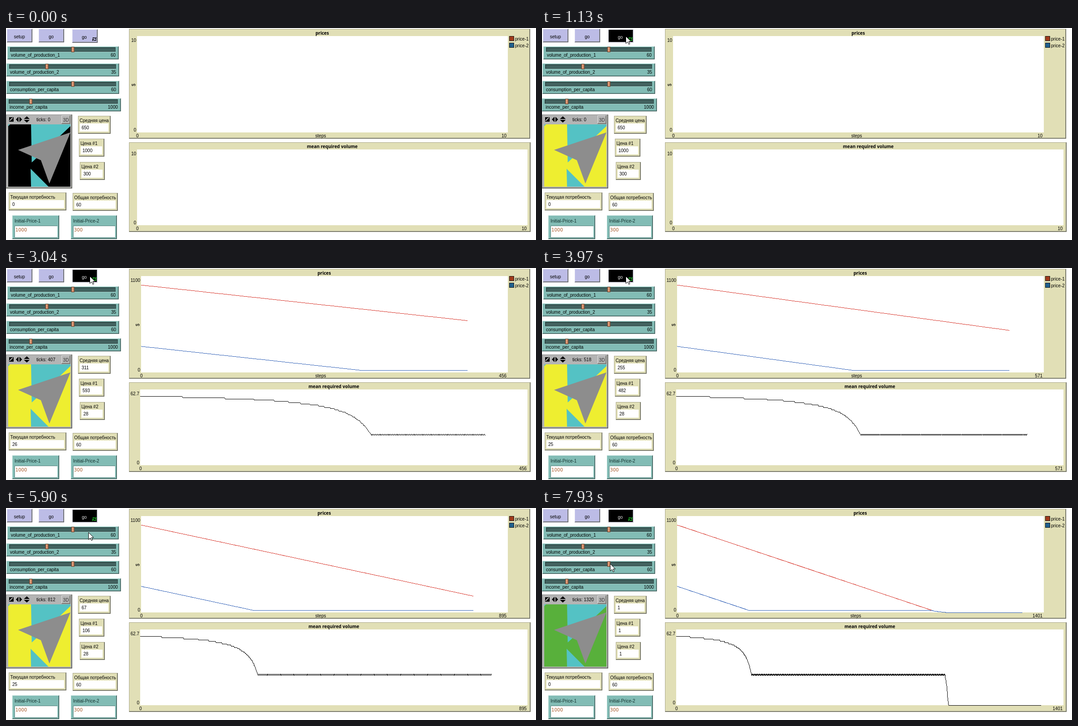
An HTML page with a canvas for the animation above (8 s loop, 1185 by 473 pixels).

```html
<!DOCTYPE html>
<html lang="ru">
<head>
<meta charset="utf-8">
<title>Market model</title>
<style>
html, body { margin: 0; width: 100%; height: 100%; overflow: hidden; background: #fff; }
canvas { display: block; }
</style>
</head>
<body>
<canvas id="stage" width="1185" height="473"></canvas>
<script>
const ctx = document.getElementById('stage').getContext('2d');
const LOOP = 8000, PRESS = 900, LIT = 1130, SATED = 6370;
const SANS = '10px "Liberation Sans", Arial, sans-serif';
const BOLD = 'bold 10px "Noto Sans", sans-serif';
const WIDE = '10.2px "DejaVu Sans", sans-serif';
const CREAM = '#e1dfb6', TEAL = '#82bcb5', LILAC = '#bcbce6';

// The interface redraws only now and then; monitors get one extra refresh
const PLOT_AT = [1390, 1670, 2300, 3040, 3330, 3970, 4500, 4890, 5250, 6230, 6740, 7100, 7400, 7700];
const MONITOR_AT = [...PLOT_AT, 5900];

// Model clock: time, ticks
const CLOCK = [[1390, 103], [3330, 461], [3970, 518], [5250, 812], [5900, 894], [6230, 950], [7100, 1083], [7700, 1320]];

// Pointer: time, x, y
const PATH = [
  [120, 1040, 456], [550, 298, 53], [860, 187, 18], [4500, 187, 18], [4920, 184, 54],
  [7060, 184, 54], [7100, 182, 61], [7500, 167, 114], [7700, 152, 124]
];

// Linear interpolation between keys, rounded
function along(keys, ms) {
  const i = keys.findIndex(k => k[0] > ms);
  if (i < 0) return keys[keys.length - 1].slice(1);
  if (i === 0) return null;
  const a = keys[i - 1], b = keys[i];
  const k = (ms - a[0]) / (b[0] - a[0]);
  return a.slice(1).map((v, j) => Math.round(v + (b[j + 1] - v) * k));
}

function ticksAt(times, ms) {
  const last = Math.max(0, ...times.filter(t => t <= ms));
  return last ? along(CLOCK, last)[0] : 0;
}

// Model
const price1 = t => t < 983 ? 1000 - t : Math.max(1, 17 - (t - 983) / 3);
const price2 = t => Math.min(price1(t), Math.max(300 - t, 28));
function need(t) {
  if (t > 272 && t < 972) return 25 + t % 2;
  return Math.max(0, 60 - Math.floor(1000 / price2(t)));
}

// The axis grows by a quarter whenever the data outruns it
function axisFor(ticks) {
  if (!ticks) return 10;
  let max = 116;
  while (max < ticks) max = Math.round((max + 1) * 1.25);
  return max;
}

// Drawing helpers
function rect(x, y, w, h, color) {
  ctx.fillStyle = color;
  ctx.fillRect(x, y, w, h);
}

function text(s, x, y, align = 'left', font = SANS, color = '#000') {
  ctx.font = font;
  ctx.textAlign = align;
  ctx.fillStyle = color;
  ctx.fillText(s, x, y + 4);
}

function poly(color, ...pts) {
  ctx.fillStyle = color;
  ctx.beginPath();
  for (let i = 0; i < pts.length; i += 2) ctx.lineTo(pts[i], pts[i + 1]);
  ctx.closePath();
  ctx.fill();
}

function panel(x0, y0, x1, y1, fill, light, dark, inner = '#85887c') {
  const w = x1 - x0, h = y1 - y0;
  rect(x0, y0, w, h, dark);
  rect(x0, y0, w - 1, h - 1, light);
  rect(x0 + 1, y0 + 1, w - 2, h - 2, inner);
  rect(x0 + 1, y0 + 1, w - 3, h - 3, fill);
}

const tealPanel = (x0, y0, x1, y1) => panel(x0, y0, x1, y1, TEAL, '#b5d9d4', '#3e5c58', '#5b8580');
const creamPanel = (x0, y0, x1, y1) => panel(x0, y0, x1, y1, CREAM, '#a9a78a', '#6f6d58');

function button(label, x, y, mid, down) {
  if (down) panel(x, y, x + 57, y + 30, '#000', '#e4e4ee', '#e4e4ee', '#b0b0b8');
  else panel(x, y, x + 57, y + 30, LILAC, '#dcdcf2', '#55556c');
  text(label, mid, y + 17, 'center', SANS, down ? '#ddd' : '#000');
}

function loopIcon(color) {
  ctx.strokeStyle = color;
  ctx.lineWidth = 1.5;
  ctx.beginPath();
  ctx.moveTo(194.5, 24); ctx.lineTo(194.5, 22); ctx.lineTo(199, 22);
  ctx.moveTo(201, 25); ctx.lineTo(201, 27.5); ctx.lineTo(196, 27.5);
  ctx.stroke();
  poly(color, 198, 24, 202, 24, 202, 20);
  poly(color, 197, 25, 193, 25, 193, 29.5);
}

function slider(label, value, max, x0, x1, y) {
  const w = x1 - x0 - 13, handle = Math.round(x0 + 6 + (w - 7) * value / max);
  tealPanel(x0, y, x1, y + 29);
  rect(x0 + 6, y + 2, w, 11, '#2e4745');
  rect(x0 + 8, y + 4, w - 3, 7, '#42625f');
  rect(x0 + 6, y + 12, w, 1, '#a5d0ca');
  rect(handle, y + 1, 7, 12, '#6e3f2a');
  rect(handle + 1, y + 2, 5, 10, '#cf8a66');
  rect(handle + 2, y + 2, 1, 9, '#efb899');
  text(label, x0 + 8, y + 19);
  text(value, x1 - 7, y + 19, 'right');
}

function monitor(label, value, x0, y0, x1) {
  creamPanel(x0, y0, x1, y0 + 40);
  rect(x0 + 4, y0 + 17, x1 - x0 - 9, 18, '#fff');
  text(label, x0 + 3.5, y0 + 9.5);
  text(value, x0 + 8, y0 + 25.5);
}

function input(label, value, x0, x1) {
  tealPanel(x0, 418, x1, 471);
  rect(x0 + 5, 441, x1 - x0 - 9, 27, '#5b8580');
  rect(x0 + 6, 442, x1 - x0 - 10, 25, '#fff');
  text(label, x0 + 5, 430, 'left', SANS, '#12302d');
  text(value, x0 + 7, 450, 'left', WIDE, '#a8592a');
}

function world(ticks, color) {
  const cyan = '#54c2c4', ink = '#000';
  panel(0, 193, 148, 358, '#b4b4b4', '#8a8a8a', '#4a4a4a');
  rect(5, 215, 139, 139, color);
  poly(cyan, 56, 215, 144, 215, 144, 219, 62, 296, 57.5, 300);
  poly(cyan, 55, 314, 95, 354, 56, 354);
  poly(cyan, 5, 215, 9, 215, 5, 219);
  poly('#8d8d8d', 144, 233, 27, 272, 78, 295, 97, 347);

  rect(7, 199, 10, 10, ink);
  poly('#fff', 8, 206, 14, 200, 16, 200, 8, 208);
  for (const s of [-1, 1]) {
    poly(ink, 29 + s, 198, 29 + s, 210, 29 + 7 * s, 204);
    poly(ink, 40, 204 + s, 53, 204 + s, 46.5, 204 + 7 * s);
  }
  text('ticks: ' + ticks, 68, 204);
  panel(124, 195, 144, 214, '#b4b4b4', '#e0e0e0', '#6a6a6a');
  text('3D', 134, 205, 'center', SANS, '#333');
}

// Crisp one-pixel line
function line(x0, y0, x1, y1) {
  const n = Math.max(Math.abs(x1 - x0), Math.abs(y1 - y0), 1);
  for (let i = 0; i <= n; i++) {
    ctx.fillRect(Math.round(x0 + (x1 - x0) * i / n), Math.round(y0 + (y1 - y0) * i / n), 1, 1);
  }
}

function curve(fn, ticks, max, box, top, color) {
  const at = t => [Math.round(box.x + box.w * t / max), Math.round(box.y - box.h * fn(t) / top)];
  ctx.fillStyle = color;
  for (let t = 1; t < ticks; t++) line(...at(t - 1), ...at(t));
}

function axes(title, top, max, box, labelY, right) {
  text(title, (box.x + right) / 2, box.y - box.h - 7, 'center', BOLD);
  text(top, box.x - 2, labelY, 'right');
  text('0', box.x - 2, box.y - 6, 'right');
  text('0', box.x - 2, box.y + 7);
  text(max, right - 2, box.y + 7, 'right');
}

function plots(ticks) {
  const max = axisFor(ticks), empty = !ticks;
  const upper = { x: empty ? 293 : 302, y: 233, h: 215 };
  const lower = { x: empty ? 293 : 300, y: 440, h: 169 };
  upper.w = 1121 - upper.x;
  lower.w = 1166 - lower.x;

  creamPanel(275, 2, 1172, 247);
  creamPanel(275, 255, 1173, 455);
  rect(upper.x, 18, upper.w + 1, upper.h, '#fff');
  rect(lower.x, 271, lower.w, lower.h, '#fff');
  axes('prices', empty ? 10 : 1100, max, upper, 27, 1121);
  axes('mean required volume', empty ? 10 : 62.7, max, lower, 280, 1166);

  text('steps', max < 1000 ? 703.5 : 701.5, 240, 'center');
  ctx.save();
  ctx.translate(upper.x - 8, 127);
  ctx.rotate(-Math.PI / 2);
  text('$', 0, 0, 'center');
  ctx.restore();

  ['#a03c1c', '#20608e'].forEach((color, i) => {
    rect(1125, 18 + 15 * i, 11, 11, '#111');
    rect(1126, 19 + 15 * i, 9, 9, color);
    text('price-' + (i + 1), 1138, 24 + 15 * i);
  });

  curve(price1, ticks, max, upper, 1100, '#d8382e');
  curve(price2, ticks, max, upper, 1100, '#3463b8');
  curve(need, ticks, max, lower, 62.7, '#000');
}

// Pointer
function tag(s, x, y) {
  ctx.font = SANS;
  rect(x - 1, y - 5, ctx.measureText(s).width + 2, 10, CREAM);
  text(s, x, y);
}

function crosshair(x, y, right, top, bottom) {
  tag(((bottom - y) / (bottom - top) * 10).toFixed(1), 292, y);
  const vx = Math.max(0, (x - 294.5) / (right - 293) * 10);
  tag(vx.toFixed(2), Math.min(x + 8, right - 24), bottom - 4);
  rect(x - 10, y, 21, 2, '#000');
  rect(x - 1, y - 10, 2, 21, '#000');
}

function arrow(x, y) {
  ctx.save();
  ctx.translate(x + 0.5, y + 0.5);
  poly('#fff', 0, 0, 0, 16, 4, 12.5, 6.5, 18, 9, 17, 6.5, 11.5, 11.5, 11.5);
  ctx.strokeStyle = '#000';
  ctx.lineWidth = 1;
  ctx.stroke();
  ctx.restore();
}

function pointer(ms) {
  const p = along(PATH, ms);
  if (!p) return;
  const [x, y] = p;
  const inside = (right, top, bottom) => x > 292 && x < right && y >= top && y < bottom;
  if (inside(1122, 18, 233)) crosshair(x, y, 1122, 18, 233);
  else if (inside(1166, 271, 440)) crosshair(x, y, 1166, 271, 440);
  else arrow(x, y);
}

function draw(ms) {
  const ticks = ticksAt(PLOT_AT, ms), seen = ticksAt(MONITOR_AT, ms);
  const running = ms >= PRESS;
  const p1 = Math.round(price1(seen)), p2 = Math.round(price2(seen));

  rect(0, 0, 1185, 473, '#fff');
  button('setup', 2, 2, 30);
  button('go', 73, 2, 101);
  button('go', 148, 3, 175, running);
  loopIcon(running ? '#1fc42c' : '#000');

  slider('volume_of_production_1', 60, 100, 3, 252, 41);
  slider('volume_of_production_2', 35, 100, 1, 253, 79);
  slider('consumption_per_capita', 60, 100, 1, 253, 118);
  slider('income_per_capita', 1000, 5200, 0, 257, 157);

  world(ticks, ms < LIT ? '#000' : ms < SATED ? '#eeee30' : '#58b03b');
  monitor('Средняя цена', Math.round((p1 + p2) / 2), 161, 196, 234);
  monitor('Цена #1', p1, 163, 247, 220);
  monitor('Цена #2', p2, 165, 299, 221);
  monitor('Текущая потребность', seen ? need(seen) : 0, 6, 367, 135);
  monitor('Общая потребность', 60, 149, 368, 250);
  input('Initial-Price-1', 1000, 14, 119);
  input('Initial-Price-2', 300, 145, 248);

  plots(ticks);
  pointer(ms);
}

const start = performance.now();
function frame() {
  draw((performance.now() - start) % LOOP);
  requestAnimationFrame(frame);
}
frame();
</script>
</body>
</html>
```
